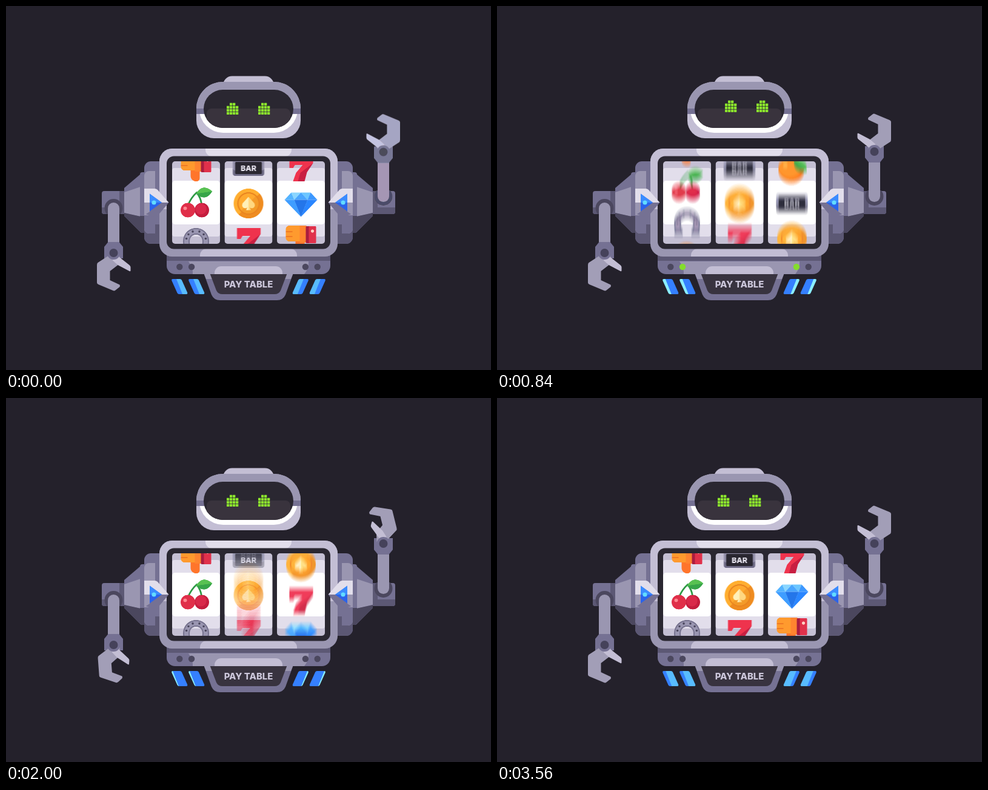
Recreate the animation shown at these times as an HTML page with a canvas. Size 800 by 600 pixels, loop 3600 ms.

```html
<!DOCTYPE html>
<html lang="en">
<head>
<meta charset="utf-8">
<title>Slot robot</title>
<style>
html, body { margin: 0; width: 100%; height: 100%; overflow: hidden; background: #24212b; }
canvas { display: block; width: 800px; height: 600px; }
</style>
</head>
<body>
<canvas id="stage" width="800" height="600"></canvas>
<script>
const LOOP = 3600, STEP = 40, SHUTTER = 20, SAMPLES = 15, PITCH = 58.5;
const BG = '#24212b', INK = '#2a2731', DEEP = '#4b475e', DARK = '#5c5874', MID = '#757193',
  GREY = '#9a96b1', PALE = '#c3bed4', LIGHT = '#e2deeb';
const makeLayer = (w, h) => Object.assign(document.createElement('canvas'), { width: w, height: h }).getContext('2d');
const stage = document.getElementById('stage').getContext('2d');
let g = stage;

// drawing helpers, all on the current context g
const path = (color, d) => { g.fillStyle = color; g.fill(new Path2D(d)); };
const poly = (color, ...points) => path(color, 'M' + points.join('L') + 'Z');
const roundShape = (x, y, w, h, r) => { const p = new Path2D(); p.roundRect(x, y, w, h, r); return p; };
const box = (color, x, y, w, h, r = 0) => { g.fillStyle = color; g.fill(roundShape(x, y, w, h, r)); };
const dot = (color, x, y, r) => { g.fillStyle = color; g.beginPath(); g.arc(x, y, r, 0, 7); g.fill(); };
const line = (color, width, d) => { g.strokeStyle = color; g.lineWidth = width; g.stroke(new Path2D(d)); };
const text = (color, size, s, x, y) => {
  g.fillStyle = color;
  g.font = `800 ${size}px Inter, "Open Sans", sans-serif`;
  g.textAlign = 'center';
  g.fillText(s, x, y);
};
const group = fn => { g.save(); fn(); g.restore(); };
const clip = (shape, fn) => group(() => { g.clip(shape); fn(); });
const mirror = fn => {
  group(fn);
  group(() => { g.translate(800, 0); g.scale(-1, 1); fn(); });
};
const onLayer = (ctx, fn) => { const old = g; g = ctx; group(fn); g = old; };
const leaf = (x, y, size, angle) => group(() => {
  g.translate(x, y); g.rotate(angle); g.scale(size, size);
  path('#37a549', 'M0 0Q.5-.6 1 0Q.5.6 0 0Z');
  path('#58c152', 'M0 0Q.5-.6 1 0Z');
});

// timing helpers
const smooth = u => { u = Math.min(1, Math.max(0, u)); return u * u * (3 - 2 * u); };
// rises from 0 to 1 after `from`, falls back after `to`
const hold = (t, from, to, rise, fall = rise) => smooth((t - from) / rise) - smooth((t - to) / fall);

// monotone curve through [time, value] keys, held at both ends
function curve(keys) {
  const n = keys.length - 1;
  const slope = i => (keys[i + 1][1] - keys[i][1]) / (keys[i + 1][0] - keys[i][0]);
  const tan = keys.map((k, i) => {
    if (i === 0 || i === n) return slope(Math.min(i, n - 1));
    const a = slope(i - 1), b = slope(i);
    return a * b <= 0 ? 0 : 2 * a * b / (a + b);
  });
  return t => {
    if (t <= keys[0][0]) return keys[0][1];
    if (t >= keys[n][0]) return keys[n][1];
    let i = 0;
    while (t > keys[i + 1][0]) i++;
    const h = keys[i + 1][0] - keys[i][0], u = (t - keys[i][0]) / h, v = 1 - u;
    return keys[i][1] * (1 + 2 * u) * v * v + tan[i] * h * u * v * v +
      keys[i + 1][1] * u * u * (3 - 2 * u) - tan[i + 1] * h * u * u * v;
  };
}

// average several moments of a moving part on a transparent layer
const sample = makeLayer(800, 600);
function blurred(layer, t, value, draw) {
  const at = u => value(t + SHUTTER * (u - .5));
  const n = Math.abs(at(0) - at(1)) > 1e-4 ? SAMPLES : 1;
  layer.clearRect(0, 0, 800, 600);
  onLayer(layer, () => {
    g.globalCompositeOperation = 'lighter';
    g.globalAlpha = 1 / n;
    for (let i = 0; i < n; i++) {
      onLayer(sample, () => { g.clearRect(0, 0, 800, 600); draw(at((i + .5) / n)); });
      g.drawImage(sample.canvas, 0, 0);
    }
  });
}

// reel symbols, top to bottom
const symbols = [
  function thumb() {
    box('#ff752b', -9, -12, 15, 34, [0, 0, 5, 9]);
    box('#ff9a2e', -25, -22, 34, 26, 6);
    box('#ff8430', -2, -22, 11, 28);
    for (const y of [-13, -5]) box('#f07a24', -25, y, 11, 1.8);
    box('#a91d3f', 8, -21, 17, 28, 2);
    box('#e0314b', 13, -21, 12, 28, 2);
    dot('#ffd0c4', 19, -13, 2.6);
  },
  function cherry() {
    line('#2f9a46', 2.8, 'M-13 2Q-8-10 1-18Q8-9 9 1');
    leaf(0, -16, 27, -.15);
    dot('#c41d3e', 9.5, 11, 12);
    dot('#d9294a', 8, 9, 9);
    dot('#e02f49', -13.5, 11, 12);
    dot('#ff8790', -18, 8, 3);
  },
  function horseshoe() {
    const bow = 'M-13.5 21V16C-28-22 28-22 13.5 16V21';
    line('#77738f', 11, bow);
    line(GREY, 7, bow);
    for (const s of [-1, 1]) {
      box(MID, s * 14 - 7, 16, 14, 6, 1.5);
      for (let a = .35; a < 2; a += .55) dot(DEEP, s * 16 * Math.sin(a), 1 - 14 * Math.cos(a), 1.7);
    }
  },
  function orange() {
    dot('#f27618', -1, 2, 21.5);
    dot('#ff8f22', -4, 0, 18);
    dot('#ffb554', -11, -6, 4);
    leaf(3, -15, 29, .75);
  },
  function bar() {
    box('#6f6b86', -26, -13, 52, 26, 4);
    box('#9490aa', -26, -13, 52, 17, 4);
    box(INK, -22, -10, 44, 20, 2);
    text('#e9e6f1', 12.3, 'BAR', 0, 4.7);
  },
  function coin() {
    dot('#ffae30', 0, 0, 24.5);
    clip(new Path2D('M26-24V26H-24Z'), () => dot('#ef8c20', 0, 0, 24.5));
    dot('#e98420', 0, 0, 18.5);
    dot('#ffa92e', 0, 0, 16.5);
    clip(new Path2D('M26-26V26H-26Z'), () => dot('#f39a28', 0, 0, 16.5));
    for (const [s, color] of [[-1, '#fff0b8'], [1, '#ffd780']]) {
      poly(color, [0, -11], [s * 10, 0], [s * 5, 6], [0, 4]);
      dot(color, s * 5.5, 3, 5);
      poly(color, [0, 2], [s * 4, 11], [0, 11]);
    }
  },
  function seven() {
    poly('#c81f42', [-19, -18], [20, -18], [20, -8], [10, 7], [6, 22], [-13, 22], [-8, 8], [3, -5], [-10, -5], [-13, 0], [-19, 0]);
    poly('#ef334d', [-19, -18], [20, -18], [20, -8], [-1, 8], [-5, 22], [-13, 22], [-8, 8], [3, -5], [-10, -5], [-13, 0], [-19, 0]);
  },
  function diamond() {
    const rim = [-27, -11, 11, 27], top = [-16, 0, 16];
    for (let i = 0; i < 3; i++) {
      poly(['#55b4ff', '#4aa6ff', '#3d98ff'][i], [rim[i], -6], [rim[i + 1], -6], [top[i], -18]);
      poly(['#3f9dff', '#2476ea', '#2a86ff'][i], [rim[i], -6], [rim[i + 1], -6], [0, 22]);
      if (i < 2) poly(['#8ad6ff', '#6cc6ff'][i], [top[i], -18], [top[i + 1], -18], [rim[i + 1], -6]);
    }
  }
];
const TURN = symbols.length * PITCH;
const strip = makeLayer(160, TURN * 2);
onLayer(strip, () => {
  g.scale(2, 2);
  symbols.forEach((draw, i) => group(() => { g.translate(40, (i + .5) * PITCH); draw(); }));
});

// every reel winds up, spins three turns and rushes into its stop;
// marks are the distance left behind at the last of the beats
const BEATS = [520, 840, 1240, 1640], DISTANCE = 24;
const spin = (start, end, ...marks) => curve([
  [start, 0], [start + 120, .25],
  ...BEATS.slice(-marks.length).map((t, i) => [t, -marks[i]]),
  [end - 40, 2 - DISTANCE], [end, -DISTANCE]
]);
const reels = [
  { first: 1, travel: spin(80, 1820, 3.52, 7.5, 13, 19.5) },
  { first: 5, travel: spin(240, 2000, 1.27, 8, 13, 18.5) },
  { first: 7, travel: spin(400, 2400, 3, 8.5, 13.5) }
];
const pull = t => 30 * hold(t, -20, 400, 240, 220);
const pinch = t => hold(t, 1580, 1860, 160, 220);
const glance = t => hold(t, 40, 960, 120);
const lid = t => Math.max(.1, Math.min(1, ...[1160, 1680].map(c => Math.abs(t - c) / 80)));

const reelLayer = makeLayer(80, 136), armLayer = makeLayer(800, 600);

function drawReel(reel, i, t) {
  const x = 274 + 86.5 * i;
  blurred(reelLayer, t, reel.travel, d => {
    const index = ((reel.first + d) % 8 + 8) % 8;
    const top = 69.5 - (index + .5) * PITCH;
    for (let k = -1; k < 2; k++) g.drawImage(strip.canvas, -.5, top + k * TURN, 80, TURN);
  });
  clip(roundShape(x, 256, 79, 136, 5), () => {
    box('#c4bfd3', x, 256, 79, 136);
    box(LIGHT, x, 267, 79, 113, 4);
    box('#ffffff', x, 288, 79, 72, 5);
    g.drawImage(reelLayer.canvas, x, 256);
  });
}

const NORMAL = ['.##.', '####', '####', '####'];
const HAPPY = ['.###.', '#####', '#...#'];

// the eyes follow the lever hand
function drawEyes(t) {
  const happy = t >= 1160 && t < 1680, rows = happy ? HAPPY : NORMAL;
  const pivot = happy ? 174 : 170, look = glance(t), d = pull(t);
  for (const x of [373.7, 425.7]) group(() => {
    g.translate(x + look * (12 - .44 * d), pivot + look * (.3 * d - 4));
    g.scale(1, lid(t));
    rows.forEach((row, j) => [...row].forEach((c, i) => {
      if (c === '#') box('#8ce62d', (i - row.length / 2) * 5 + .3, 159.7 - pivot + j * 5, 4.3, 4.3, .4);
    }));
  });
}

function drawHead() {
  const skull = color => box(color, 314, 125, 172, 93, [44, 44, 29, 29]);
  const visor = roundShape(326, 138, 148, 63, 31.5);
  box(PALE, 358, 115.5, 84, 30, [15, 15, 0, 0]);
  skull(PALE);
  clip(roundShape(300, 100, 200, 78), () => {
    skull(GREY);
    box(MID, 314, 169, 172, 9);
  });
  clip(roundShape(300, 178, 200, 50), () => box('#ffffff', 319, 130, 162, 79, 39));
  clip(visor, () => {
    box(INK, 326, 138, 148, 63);
    box('#39333d', 331, 169, 138, 40, [8, 8, 0, 0]);
  });
}

function drawShoulder() {
  box(MID, 158, 305, 37, 38, [4, 0, 0, 4]);
  box(DARK, 158, 332, 37, 11, [0, 0, 0, 4]);
  box(DARK, 187, 305, 8, 38);
  poly(MID, [195, 300], [222, 277], [222, 373], [195, 346]);
  poly(GREY, [195, 307], [222, 298], [222, 347], [195, 341]);
  poly(DEEP, [195, 341], [222, 347], [222, 373], [195, 346]);
  box(MID, 221, 274, 10, 100, [4, 0, 0, 4]);
  box(DEEP, 221, 346, 10, 28, [0, 0, 0, 4]);
  box(MID, 228, 256, 30, 136, [11, 0, 0, 11]);
  box(DARK, 228, 360, 30, 32, [0, 0, 0, 11]);
  box(GREY, 228, 272, 18, 103, [8, 0, 0, 8]);
  box(MID, 228, 345, 18, 30, [0, 0, 0, 8]);
}

function drawArrow() {
  path(MID, 'M228 324H268.500L249 347Q247 349 244 348L228 342Z');
  path(LIGHT, 'M228 301H245Q248 301 250 303L268.500 324H228Z');
  poly(GREY, [228, 324], [237, 324], [237, 339], [228, 345]);
  poly('#2b63ea', [237, 309.5], [257, 324], [237, 338.5]);
  poly('#3b8cff', [237, 309.5], [257, 324], [237, 324]);
  dot('#62dcff', 244, 324, 3.6);
}

// arm hanging from the elbow; d shortens it, grip closes the claw
function drawArm(d, grip) {
  clip(roundShape(158, 305, 37, 38), () => dot(DEEP, 177.5, 333, 15));
  box(GREY, 168, 324, 19, 76 - d, [9.5, 9.5, 0, 0]);
  g.translate(177.5, 407 - d);
  poly(MID, [-15.5, -10], [-9, -18], [9, -18], [15.5, -10], [15.5, 9], [-15.5, 9]);
  group(() => {
    g.rotate(-.25 * grip);
    path('#a29eb7', 'M-9 5L-26 16Q-27.500 17-27.500 20V49Q-27.500 51-25 52L-1 62Q1 63 3 61.500L10 56Q11 54 10 52.500L-6 45V30L7 20L10 5Z');
  });
  group(() => {
    g.rotate(.28 * grip);
    path(PALE, 'M-2 12L7 5L26 20Q28 21.500 28 23.500V29Q28 31 26 30L7 20Z');
  });
  dot(MID, 0, 0, 11);
  dot('#45425a', 0, 0, 7);
}

function drawArms(t) {
  group(() => drawArm(0, pinch(t)));
  blurred(armLayer, t, pull, d => {
    g.translate(800, 647);
    g.rotate(Math.PI);
    drawArm(d, pinch(t - 120));
  });
  g.drawImage(armLayer.canvas, 0, 0);
}

function drawStripes(t) {
  const bands = [['#3580ff', 20], ['#58bcff', 14], ['#8beeff', 8]], period = 42;
  for (const x of [273, 301]) group(() => {
    g.translate(x, 450);
    clip(new Path2D('M2 0H14Q16 0 17 2L26 22Q27 25 24.500 25H12.500Q10.500 25 9.500 23L.5 3Q-.5 0 2 0Z'), () => {
      let a = period * (t % 600 / 600 - 2) - 12;
      for (let k = 0; k < 3; k++) for (const [color, w] of bands) {
        path(color, `M${a} 0h${w + .5}l10 25h${-w - .5}Z`);
        a += w;
      }
    });
  });
}

// lamps from left to right
function lampOn(i, t) {
  const inner = i === 1 || i === 2, beat = Math.floor(t / 80);
  return beat === 9 && !inner || beat === 10 && inner || beat === 29 + i;
}

function drawBase(t) {
  path(MID, 'M326 440H474L461 476Q457 485 447 485H353Q343 485 339 476Z');
  mirror(() => poly(GREY, [326, 440], [337, 440], [341, 450], [330, 450]));
  path('#38333f', 'M336 440H464L453 469Q450 475 443 475H357Q350 475 347 469Z');
  text('#cbc6da', 14.9, 'PAY TABLE', 400, 463.5);
  box(MID, 265, 405, 270, 37, [0, 0, 14, 14]);
  box(DARK, 265, 405, 270, 15);
  path(GREY, 'M301 421H499Q500 432 492 442H308Q309 432 301 421Z');
  box(PALE, 344, 429, 112, 13, [11, 11, 0, 0]);
  for (let i = 0; i < 4; i++) dot(lampOn(i, t) ? '#84dd2c' : DEEP, 286.3 + 19.8 * i + (i > 1 ? 168 : 0), 430, 5.2);
}

function drawPanel() {
  const frame = color => box(color, 253, 235, 294, 178, 21);
  frame(GREY);
  clip(roundShape(250, 230, 300, 105), () => frame(PALE));
  box(LIGHT, 329, 235, 142, 13, [0, 0, 11, 11]);
  box(PALE, 320, 400, 160, 13, [11, 11, 0, 0]);
  box(INK, 265, 247.5, 270, 153, 12);
}

function draw(t) {
  box(BG, 0, 0, 800, 600);
  mirror(drawShoulder);
  drawArms(t);
  drawHead();
  drawEyes(t);
  drawBase(t);
  mirror(() => drawStripes(t));
  drawPanel();
  reels.forEach((reel, i) => drawReel(reel, i, t));
  mirror(drawArrow);
}

const start = performance.now();
function tick() {
  const t = (performance.now() - start) % LOOP;
  draw(Math.floor(t / STEP) * STEP);
  requestAnimationFrame(tick);
}
tick();
</script>
</body>
</html>
```
